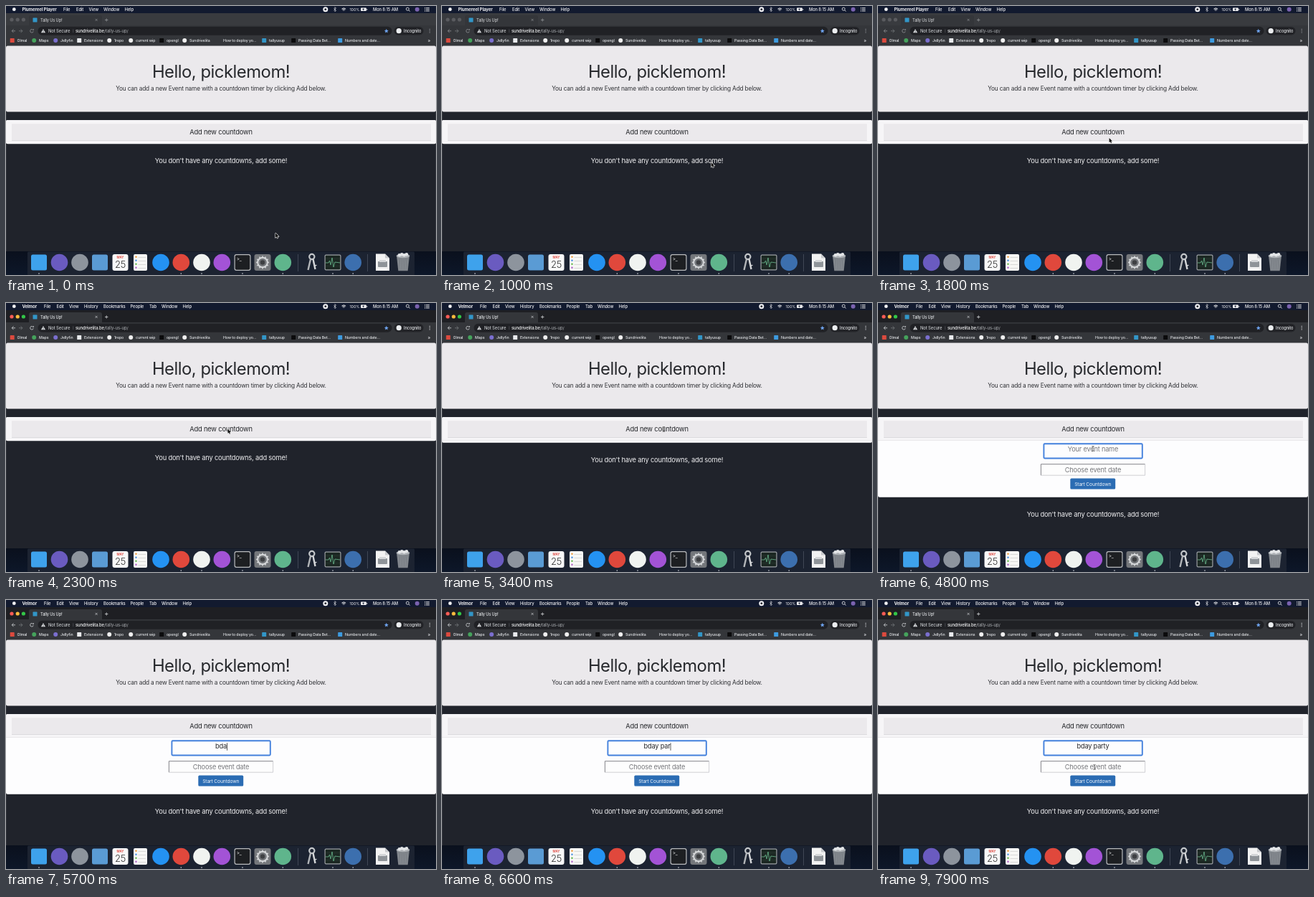
These frames come from a looping animation (600x375 px, 8 s). An HTML page with a canvas:

```html
<!DOCTYPE html>
<html lang="en">
<head>
<meta charset="utf-8">
<title>Countdown demo</title>
<style>
html, body { margin: 0; width: 100%; height: 100%; overflow: hidden; background: #20232b; }
canvas { display: block; width: 600px; height: 375px; }
</style>
</head>
<body>
<canvas id="stage"></canvas>
<script>
const canvas = document.getElementById('stage');
const ctx = canvas.getContext('2d');
const ratio = window.devicePixelRatio || 1;
canvas.width = 600 * ratio;
canvas.height = 375 * ratio;

const LOOP = 8000, STEP = 100;
const ACTIVATE = 2100, IBEAM = 2500, OPEN = 3360, OPEN_MS = 370, FOCUS = 4500;
const TYPED = 'bday party';
const KEYS = [5200, 5380, 5560, 5740, 5920, 6120, 6320, 6520, 6760, 7000];
const POINTER_BACK = 7200;

// time, x, y of the pointer
const PATH = [
  [0, 376, 316.5], [200, 376, 316.5], [1000, 375.7, 218],
  [1300, 375.7, 218], [2000, 309.5, 175.5], [3800, 309.5, 176],
  [4400, 300, 203], [7200, 300, 203], [7700, 302, 233], [8000, 302, 233]
];

const clamp = v => Math.max(0, Math.min(1, v));
const smooth = v => v * v * (3 - 2 * v);

function text(s, x, y, size, color, align = 'left', weight = 400) {
  ctx.font = `${weight} ${size}px Inter, "Open Sans", sans-serif`;
  ctx.letterSpacing = (-0.02 * size) + 'px';
  ctx.textAlign = align;
  ctx.fillStyle = color;
  ctx.fillText(s, x, y);
  return ctx.measureText(s).width;
}

function box(x, y, w, h, color, r = 0) {
  ctx.fillStyle = color;
  ctx.beginPath();
  ctx.roundRect(x, y, w, h, r);
  ctx.fill();
}

function disc(x, y, r, color) {
  ctx.fillStyle = color;
  ctx.beginPath();
  ctx.arc(x, y, r, 0, Math.PI * 2);
  ctx.fill();
}

function line(color, width, ...pts) {
  ctx.strokeStyle = color;
  ctx.lineWidth = width;
  ctx.beginPath();
  for (let i = 0; i < pts.length; i += 2) ctx.lineTo(pts[i], pts[i + 1]);
  ctx.stroke();
}

function arc(x, y, r, a, b, color, width) {
  ctx.strokeStyle = color;
  ctx.lineWidth = width;
  ctx.beginPath();
  ctx.arc(x, y, r, a, b);
  ctx.stroke();
}

function shape(color, ...pts) {
  ctx.fillStyle = color;
  ctx.beginPath();
  for (let i = 0; i < pts.length; i += 2) ctx.lineTo(pts[i], pts[i + 1]);
  ctx.closePath();
  ctx.fill();
}

const IDLE_MENU = [['File', 80], ['Edit', 98], ['View', 115.5], ['Window', 136], ['Help', 165.5]];
const LIVE_MENU = [['File', 53], ['Edit', 70.5], ['View', 88], ['History', 109], ['Bookmarks', 136],
  ['People', 173.5], ['Tab', 200], ['Window', 217], ['Help', 246.5]];

function menuBar(live) {
  const ink = '#f1f1f3', back = '#121a2f';
  box(0, 0, 600, 10, back);
  disc(11.3, 4.7, 2.4, ink);
  text(live ? 'Velmor' : 'Plumereel Player', 22.5, 7, 6.1, ink, 'left', 700);
  for (const [s, x] of live ? LIVE_MENU : IDLE_MENU) text(s, x, 7, 5.9, ink, 'left', 500);

  // recording, bluetooth, wireless, battery
  disc(445.8, 4.7, 3.5, ink);
  box(444.5, 3.4, 2.6, 2.6, back, 0.4);
  line(ink, 0.6, 457.3, 3.2, 460.6, 6.2, 459, 7.8, 459, 1.6, 460.6, 3.2, 457.3, 6.2);
  for (const r of [1.4, 2.9, 4.3]) arc(471.3, 7.3, r, -2.3, -0.84, ink, 0.9);
  text('100%', 479.5, 7, 5.4, ink);
  box(495, 2.6, 7.8, 4.4, ink, 0.8);
  box(503.3, 3.9, 0.9, 1.8, ink);
  shape(back, 499.4, 2.8, 497, 5, 498.5, 5, 498, 6.8, 500.4, 4.5, 498.9, 4.5);

  text('Mon 8:15 AM', 512, 7, 5.8, ink, 'left', 500);
  arc(560.3, 4.2, 2, 0, 7, ink, 0.8);
  line(ink, 0.9, 561.8, 5.7, 563.6, 7.5);
  disc(573.7, 4.7, 3, '#7a62b0');
  for (let i = 0; i < 3; i++) {
    box(584, 2.3 + i * 2.1, 1, 0.9, ink);
    box(585.8, 2.3 + i * 2.1, 5, 0.9, ink);
  }
}

// label, text x, icon colour, icon kind
const BOOKMARKS = [
  ['Olmal', 15.5, '#dc4a3e', 'sq'], ['Maps', 46, '#45a35c', 'dot'], ['Jellyfin', 76, '#7b6fd0', 'dot'],
  ['Extensions', 109, '#e8eaed', 'sq'], ['1repo', 151, '#f0f0f0', 'dot'], ['current wip', 181, '#f0f0f0', 'dot'],
  ['opengl', 224, '#0b0b0c', 'sq'], ['Sundrivelita', 256, '#f0f0f0', 'dot'], ['How to deploy yo...', 303, '', ''],
  ['tallyusup', 367, '#3296c8', 'sq'], ['Passing Data Bet...', 408, '#0b0b0c', 'sq'],
  ['Numbers and date...', 473, '#3d9be0', 'sq']
];

function browser(live) {
  const ink = '#e4e6e9', dim = live ? '#d5d7da' : '#909296';
  box(0, 10, 600, 332, live ? '#1e1f23' : '#393b3f');
  const lights = live ? ['#fb5c55', '#fcbc3e', '#33c748'] : ['#5b5c60', '#5b5c60', '#5b5c60'];
  lights.forEach((c, i) => disc(8 + i * 8.2, 19, 2.6, c));

  box(32, 13, 102, 17, '#34363a', 3);
  box(0, 27, 600, 28.5, '#34363a');
  box(37.5, 16.6, 6, 6, '#3296c8', 0.6);
  text('Tally Us Up!', 48, 21.6, 5.6, live ? ink : '#c6c8cb', 'left', 500);
  line(dim, 0.7, 124.6, 17.9, 127.6, 20.9);
  line(dim, 0.7, 127.6, 17.9, 124.6, 20.9);
  line(dim, 0.8, 138, 19.5, 142.4, 19.5);
  line(dim, 0.8, 140.2, 17.3, 140.2, 21.7);

  // navigation and address
  line(dim, 0.8, 10.5, 32.4, 8.2, 34.8, 10.5, 37.2);
  line(dim, 0.8, 8.3, 34.8, 13, 34.8);
  line('#777a7e', 0.8, 20.6, 32.4, 22.9, 34.8, 20.6, 37.2);
  line('#777a7e', 0.8, 18, 34.8, 22.8, 34.8);
  arc(36, 34.8, 2.3, 0.2, 5.4, dim, 0.8);
  shape(dim, 36.6, 33.8, 38.8, 33.8, 38.8, 31.8);
  box(44.5, 28.7, 494, 12, '#202125', 6);
  shape('#dfe1e4', 52, 32, 55, 37.2, 49, 37.2);
  box(51.7, 33.7, 0.7, 1.8, '#202125');
  box(51.7, 36, 0.7, 0.7, '#202125');
  text('Not Secure', 59, 36.9, 5.9, '#c9cccf', 'left', 500);
  box(93.6, 32.3, 0.5, 5, '#66696d');
  const w = text('sundrivelita.be', 97, 36.9, 5.9, '#f5f6f7', 'left', 500);
  text('/tally-us-up/', 97 + w, 36.9, 5.9, '#9a9da1', 'left', 500);
  const star = [];
  for (let i = 0; i < 10; i++) {
    const r = i % 2 ? 1.4 : 3.2, a = i * Math.PI / 5 - Math.PI / 2;
    star.push(530.8 + r * Math.cos(a), 34.9 + r * Math.sin(a));
  }
  shape('#6fa5f2', ...star);
  box(541.5, 29, 41, 11.4, '#222327', 5.7);
  disc(548.2, 34.7, 3.6, '#eceef0');
  text('Incognito', 555, 36.8, 5.7, ink, 'left', 500);
  for (let i = 0; i < 3; i++) disc(591.2, 32.5 + i * 2.2, 0.65, dim);

  for (const [s, x, color, kind] of BOOKMARKS) {
    if (kind === 'dot') disc(x - 6.8, 48, 3, color);
    if (kind === 'sq') box(x - 9.8, 45.1, 6, 6, color, 0.6);
    text(s, x, 49.9, 5.25, ink, 'left', 500);
  }
  text('»', 588.5, 50, 6.5, ink);
}

function field(x, y, w, h) {
  box(x, y, w, h, '#fdfdfd');
  line('#77787c', 0.9, x, y + h, x, y, x + w, y);
  line('#c4c4c8', 0.8, x, y + h, x + w, y + h, x + w, y);
}

function form(t) {
  const typed = KEYS.filter(k => k <= t).length;
  if (t >= FOCUS) {
    ctx.strokeStyle = '#4380dc';
    ctx.lineWidth = 1.9;
    ctx.beginPath();
    ctx.roundRect(231.4, 196.2, 137.4, 20.3, 1.2);
    ctx.stroke();
  } else field(232, 197, 136, 19);

  if (typed) {
    const w = text(TYPED.slice(0, typed), 300, 207.3, 9.2, '#26282c', 'center');
    const since = t - KEYS[typed - 1];
    if (since % 1000 < 500) box(300 + w / 2 + 0.2, 199.3, 0.7, 10.4, '#111');
  } else text('Your event name', 300, 207.3, 9.2, '#77787c', 'center');

  field(227.4, 224.7, 145.2, 15.5);
  text('Choose event date', 300, 235.8, 9.2, '#77787c', 'center');
  box(268.3, 244.6, 62.9, 15, '#2b6cb3', 1.6);
  text('Start Countdown', 299.8, 254.6, 6.7, '#f2f6fb', 'center');
}

function page(t) {
  const grow = 78.5 * smooth(clamp((t - OPEN) / OPEN_MS));
  box(0, 55.5, 600, 286.5, '#20232b');
  box(0, 55.5, 0.5, 286.5, '#3a3d44');
  box(599.5, 55.5, 0.5, 286.5, '#3a3d44');
  box(0, 55.6, 600, 91.8, '#ebe9ec', 2.2);
  text('Hello, picklemom!', 300, 100, 23.8, '#26282c', 'center');
  text('You can add a new Event name with a countdown timer by clicking Add below.',
    300, 117.7, 8.27, '#303236', 'center');

  ctx.save();
  ctx.beginPath();
  ctx.roundRect(0, 159.1, 600, 33.2 + grow, 2.2);
  ctx.clip();
  box(0, 159, 600, 120, '#fdfdfe');
  box(0, 159, 600, 32.6, '#f6f5f7');
  box(8, 164.2, 585, 23.4, '#ebe9ec', 0.8);
  line('#d3d2d6', 0.7, 8, 187.5, 593, 187.5);
  text('Add new countdown', 300, 179.2, 9.35, '#26282c', 'center');
  if (grow > 0) {
    box(0, 191.5, 600, 0.6, '#d9d8dc');
    form(t);
  }
  ctx.restore();
  text("You don't have any countdowns, add some!", 300, 219.2 + grow, 9.3, '#f0f0f2', 'center');
}

// centre x, kind, colour of plain dock items
const APPS = [
  [46, 'sq', '#3ea2ec'], [74.5, 'dot', '#6a5bc0'], [103, 'dot', '#8d949d'], [131, 'sq', '#5a9bd4'],
  [216, 'dot', '#2492f2'], [244.3, 'dot', '#e0483c'], [273, 'dot', '#f0f3f0'], [301.3, 'dot', '#a353d6'],
  [386.3, 'dot', '#5fb58c'], [484.2, 'dot', '#3c6fae']
];

function dock() {
  const wall = ctx.createLinearGradient(0, 342, 0, 375);
  wall.addColorStop(0, '#0a101d');
  wall.addColorStop(1, '#0d1729');
  box(0, 342, 600, 33, wall);
  box(30, 342.4, 540, 33, '#1c2331', 1.5);
  for (const [x, kind, color] of APPS) {
    if (kind === 'sq') box(x - 11, 346.5, 22, 22, color, 2.5);
    else disc(x, 357.5, 11.8, color);
  }

  // calendar
  box(148.5, 346, 22, 23, '#f8f8f8', 3);
  text('MAY', 159.5, 352, 4.4, '#e0463e', 'center', 600);
  text('25', 159.5, 364.8, 13, '#333', 'center', 300);

  // list
  box(178, 346, 19, 23, '#f7f7f5', 2);
  ['#f19a37', '#4a90e2', '#62b84a', '#b060c8'].forEach((c, i) => {
    disc(181.5, 349.8 + i * 5, 1.2, c);
    box(184.5, 350.4 + i * 5, 10.5, 0.5, '#bbb');
  });

  // terminal
  box(318.5, 346, 23, 23, '#b9bbbd', 3);
  box(319.7, 347.2, 20.6, 20.6, '#1d1f22', 2);
  text('>_', 321.7, 354.6, 6.5, '#f1f1f1');

  // gear
  box(346.5, 346, 23, 23, '#74777b', 3);
  for (let i = 0; i < 12; i++) {
    const a = i * Math.PI / 6;
    line('#d5d7d9', 1.6, 358 + 6 * Math.cos(a), 357.5 + 6 * Math.sin(a),
      358 + 9 * Math.cos(a), 357.5 + 9 * Math.sin(a));
  }
  arc(358, 357.5, 6.8, 0, 7, '#d5d7d9', 2);
  disc(358, 357.5, 3.2, '#3e4043');

  // keys
  arc(426.8, 349.5, 3.6, 0, 7, '#c4c7ca', 2.2);
  line('#b3b6b9', 2.4, 425, 353, 421.5, 368);
  line('#d5d7d9', 2.4, 428.5, 353, 431.5, 367);
  line('#d5d7d9', 1.4, 430.5, 362, 433.5, 361.4);

  // activity graph
  box(444.5, 346.5, 23, 22, '#9ca0a3', 2);
  box(445.7, 347.7, 20.6, 19.6, '#1b2722', 1);
  for (let i = 1; i < 4; i++) box(446, 347.5 + i * 5, 20, 0.3, '#3c5146');
  line('#72c99a', 0.7, 446, 358, 450, 358, 451.5, 355, 453, 361, 455, 351, 457, 364, 459, 357, 466, 358);

  box(407, 346, 0.6, 24, '#59606e');
  box(504.3, 346, 0.6, 24, '#59606e');

  // document and bin
  shape('#f2f2f2', 516, 345.5, 529, 345.5, 535, 351.5, 535, 369, 516, 369);
  shape('#c8cacd', 529, 345.5, 535, 351.5, 529, 351.5);
  box(519, 356, 13, 8, '#8f9499', 1);
  box(521, 354, 9, 3, '#d4d6d8');
  shape('#777c82', 545, 348.5, 563, 348.5, 560.7, 369.3, 547.3, 369.3);
  for (let i = 0; i < 6; i++) line('#a4a9ae', 0.5, 547 + i * 2.8, 350, 548.6 + i * 2.15, 368.5);
  ctx.fillStyle = '#aeb2b6';
  ctx.beginPath();
  ctx.ellipse(554, 348.5, 9.4, 2.7, 0, 0, 7);
  ctx.fill();
  for (let i = 0; i < 4; i++) disc(549 + i * 3.3, 347.3 - i % 2, 2.3, '#e4e6e8');

  for (const x of [46, 244.3, 273, 330, 386.3, 456, 484.2]) disc(x, 373, 0.8, '#dfe2e8');
}

function pointer(t) {
  if (t >= KEYS[0] && t < POINTER_BACK) return;
  const i = PATH.findIndex((p, n) => n > 0 && t <= p[0]);
  const [t0, x0, y0] = PATH[i - 1], [t1, x1, y1] = PATH[i];
  const k = smooth((t - t0) / (t1 - t0));
  ctx.save();
  ctx.translate(x0 + (x1 - x0) * k, y0 + (y1 - y0) * k);
  if (t < IBEAM) {
    const tip = [0, 0, 0, 6.3, 1.4, 5, 2.4, 7.2, 3.4, 6.7, 2.5, 4.6, 4.4, 4.5];
    line('#f4f4f4', 1.1, ...tip, 0, 0);
    shape('#0a0a0a', ...tip);
  } else {
    line('#f5f5f5', 1.4, 0, -3, 0, 3);
    line('#222', 0.7, 0, -3, 0, 3);
    for (const s of [-1, 1]) line('#222', 0.7, -1.5, 3.5 * s, 0, 2.9 * s, 1.5, 3.5 * s);
  }
  ctx.restore();
}

function draw(now) {
  const t = Math.floor((now % LOOP) / STEP) * STEP;
  const live = t >= ACTIVATE;
  ctx.setTransform(ratio, 0, 0, ratio, 0, 0);
  menuBar(live);
  browser(live);
  page(t);
  dock();
  pointer(t);
}

const start = performance.now();
function tick() {
  draw(performance.now() - start);
  requestAnimationFrame(tick);
}
tick();
</script>
</body>
</html>
```
